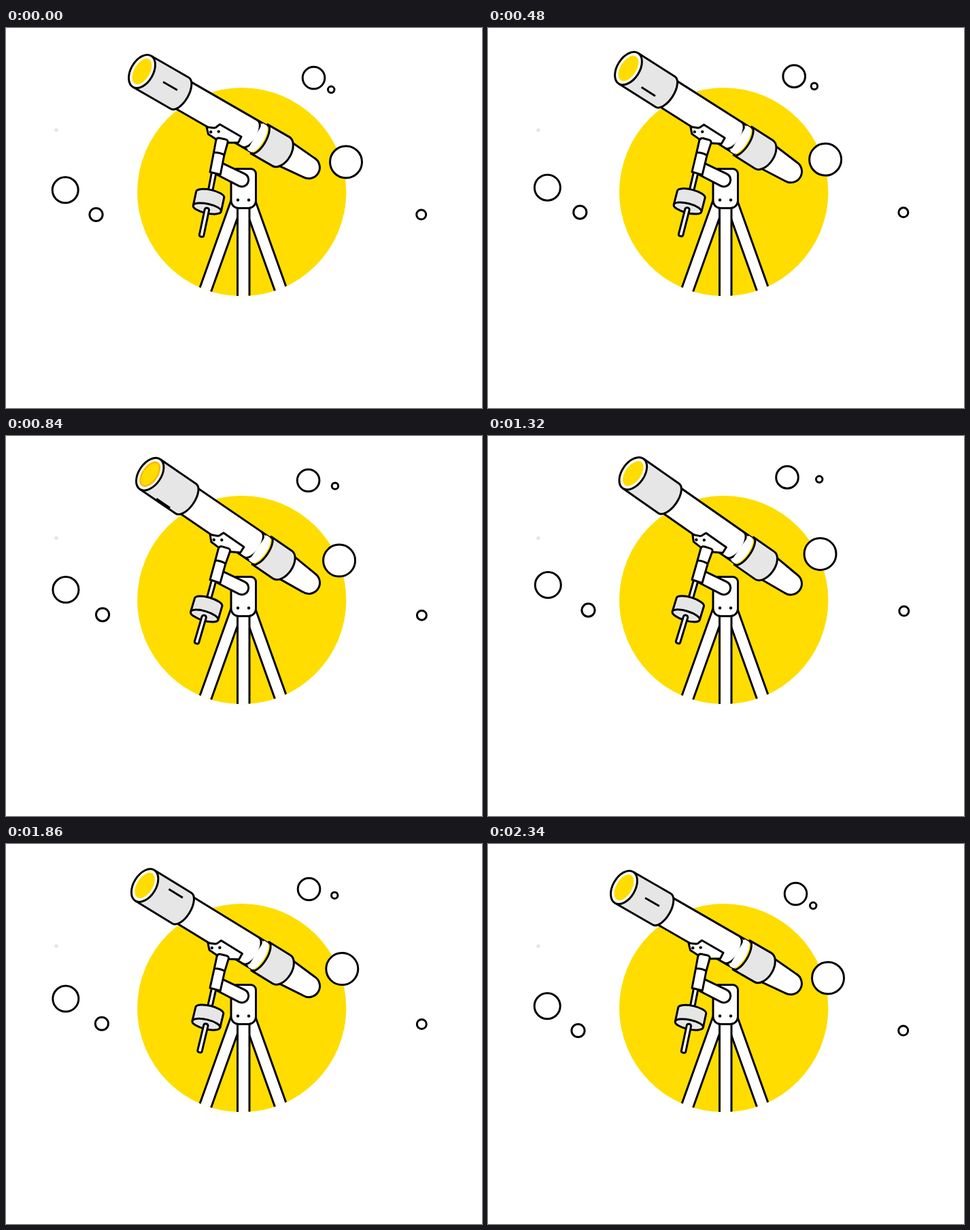
An HTML page for the animation above (2.85 s loop, 700 px wide and 560 px high).

```html
<!DOCTYPE html>
<html lang="en">
<head>
<meta charset="utf-8">
<title>Telescope</title>
<style>
  html, body { margin: 0; width: 100%; height: 100%; overflow: hidden; background: #fff; }
  svg { display: block; width: 100vw; height: 100vh; }
  .ink { stroke: #000; stroke-width: 3; stroke-linejoin: round; fill: #fff; }
  .line { fill: none; }
  .gray { fill: #e6e6e6; }
</style>
</head>
<body>
<svg viewBox="0 0 700 560">
  <defs>
    <clipPath id="disc"><circle cx="346.7" cy="241.7" r="153.6"/></clipPath>
    <clipPath id="hoodClip"><path d="M0 -27.2H64A13.7 27.2 0 0 1 64 27.2H0A16.5 27.2 0 0 0 0 -27.2Z"/></clipPath>
  </defs>

  <circle cx="346.7" cy="241.7" r="153.6" fill="#fd0"/>
  <circle cx="74" cy="150.5" r="2.8" fill="#e6e6e6"/>

  <!-- tripod -->
  <g clip-path="url(#disc)" class="ink">
    <path d="M331.7 252L278.2 402H296.8L350.3 252"/>
    <path d="M365.8 252L419.3 402H400.7L347.2 252"/>
    <path d="M340.5 260V400H358V260"/>
  </g>
  <path class="ink" d="M338.5 207.5H360A7.5 7.5 0 0 1 367.5 215V254.5A11 11 0 0 1 356.5 265.5H342A11 11 0 0 1 331 254.5V215A7.5 7.5 0 0 1 338.5 207.5Z"/>
  <circle cx="341" cy="253.5" r="2.2"/>
  <circle cx="357" cy="253.5" r="2.2"/>
  <path class="ink" d="M316 198.1L351 214.8A9.8 9.8 0 0 1 342.7 232.8L310 216"/>

  <g id="scope">
    <!-- counterweight -->
    <path class="ink" d="M303 210L296.5 244H303L309.5 211Z"/>
    <g transform="translate(300.2 245.5) rotate(12)" class="ink gray">
      <path d="M-21 0A21 7 0 0 1 21 0V21A21 7 0 0 1 -21 21Z"/>
      <path class="line" d="M-21 21A21 7 0 0 1 21 21"/>
    </g>
    <path class="ink" d="M292.2 267.5Q293 264.8 295.8 265.3T298.6 268.5L290.8 306Q290.3 308.3 287.3 307.7T284.3 305Z"/>

    <!-- optical tube -->
    <g transform="translate(200 64) rotate(30)">
      <path class="ink" d="M240 -20L283 -16.3A16.3 16.3 0 0 1 283 16.3L240 20Z"/>
      <path class="ink" d="M60 -22.7H199V22.7H60Z"/>
      <path class="ink line" d="M183 -22.7A11 22.7 0 0 1 183 22.7"/>
      <path class="gray" d="M199 -24.7A10 24.7 0 0 1 199 24.7H236A15 24.7 0 0 0 236 -24.7Z"/>
      <path d="M199 -22.7A10 24 0 0 1 199 22.7H192V-22.7Z" fill="#fff"/>
      <path class="ink line" d="M199 -24.7A10 24.7 0 0 1 199 24.7H236A15 24.7 0 0 0 236 -24.7Z"/>
      <path class="gray" d="M0 -26.6H64A13 26.6 0 0 1 64 26.6H0Z"/>
      <g clip-path="url(#hoodClip)"><path id="slot" class="ink" d="M-12 0H12"/></g>
      <path class="ink line" d="M0 -26.6H64A13 26.6 0 0 1 64 26.6H0"/>
      <ellipse class="ink" rx="16.4" ry="26.6"/>
      <ellipse rx="11.6" ry="20.9" fill="#fd0"/>
      <path id="glint" d="M-10.6 0A10.6 19.9 0 0 1 10.6 0A10.6 19.9 0 0 1 -10.6 0" pathLength="100" fill="none" stroke="#ffb400" stroke-width="2.3"/>
    </g>

    <!-- saddle and shaft -->
    <path class="ink" d="M295 146L306 147.2Q309 147 310.5 145L314.5 142L346 160.3L341.5 169H325L309 164L297.5 156.5Z"/>
    <circle cx="301.2" cy="153.3" r="2.2"/>
    <circle cx="312.7" cy="152.6" r="2.2"/>
    <path class="ink" d="M305.5 183.5L308.7 166Q309.5 161.5 314 162.2L322.5 164Q327 165 326 169L321 187L315.3 216L300 212.3Z"/>
    <path class="ink line" d="M305.5 183.5Q314 183 321 187"/>
  </g>

  <g id="bubbles" class="ink"></g>
</svg>

<script>
const LOOP = 2850, STEP = 30, PEAK = 1310, END = 2340;
const $ = id => document.getElementById(id);
const clamp = v => Math.min(1, Math.max(0, v));
const span = (t, a, b) => clamp((t - a) / (b - a));
const smooth = u => u * u * (3 - 2 * u);

// cubic-bezier(a, 0, b, 1)
function ease(u, a, b) {
  let lo = 0, hi = 1;
  for (let i = 0; i < 24; i++) {
    const s = (lo + hi) / 2, r = 1 - s;
    if (3 * r * r * s * a + 3 * r * s * s * b + s * s * s < u) lo = s; else hi = s;
  }
  return smooth((lo + hi) / 2);
}

// out to the peak and back, each way with its own curve
function swing(t, out, back) {
  return t < PEAK ? ease(span(t, 0, PEAK), ...out)
                  : 1 - ease(span(t, PEAK, END), ...back);
}

// x, y, radius, travel x, travel y, bends (out, back) as fractions of the travel
const bubbles = [
  [452.5, 73.5, 16.3, -12.5, -12.6],
  [478.2, 90.8, 4.7, 9, -27],
  [500, 197.5, 23.5, -11.5, -23.6, [1, 0.4], [0.38, 0.52]],
  [87.2, 238.8, 19, 1.1, -19.2],
  [132.5, 275, 9.6, 15, -18.4],
  [610.7, 275, 7, 1.1, -17]
].map(([x, y, r, dx, dy, out = [0.5, 0.5], back = out]) => {
  const el = document.createElementNS("http://www.w3.org/2000/svg", "circle");
  el.setAttribute("r", r);
  $("bubbles").append(el);
  return { el, x, y, dx, dy, out, back };
});

const bend = (s, c) => 2 * s * (1 - s) * c + s * s;

function draw(t) {
  const tilt = 5 * swing(t, [0.35, 0.3], [0.35, 0.45]);
  $("scope").setAttribute("transform", `rotate(${tilt} 306.7 212.5)`);

  // the slot rolls under the hood and returns over its top
  const roll = t < PEAK - 50 ? 0.0317 * t : -0.0244 * (END - t);
  const along = 46.7 - (roll > 0 ? 0.237 * roll : 0.0132 * roll * roll);
  $("slot").setAttribute("transform", `translate(${along} ${roll - 2.1})`);

  const head = 100 * smooth(span(t, 460, 870));
  const tail = 100 * smooth(span(t, 930, 1335));
  const glint = $("glint");
  glint.style.display = head - tail > 0.01 ? "" : "none";
  glint.setAttribute("stroke-dasharray", `${head - tail} 200`);
  glint.setAttribute("stroke-dashoffset", -tail);

  const s = swing(t, [0.555, 0.63], [0.44, 0.754]);
  for (const b of bubbles) {
    const [cx, cy] = t < PEAK ? b.out : b.back;
    b.el.setAttribute("cx", b.x + b.dx * bend(s, cx));
    b.el.setAttribute("cy", b.y + b.dy * bend(s, cy));
  }
}

const start = performance.now();
function tick() {
  const t = Math.floor(((performance.now() - start) % LOOP) / STEP) * STEP;
  draw(t < 2 * STEP ? 0 : Math.min(t, END));
  requestAnimationFrame(tick);
}
tick();
</script>
</body>
</html>
```
